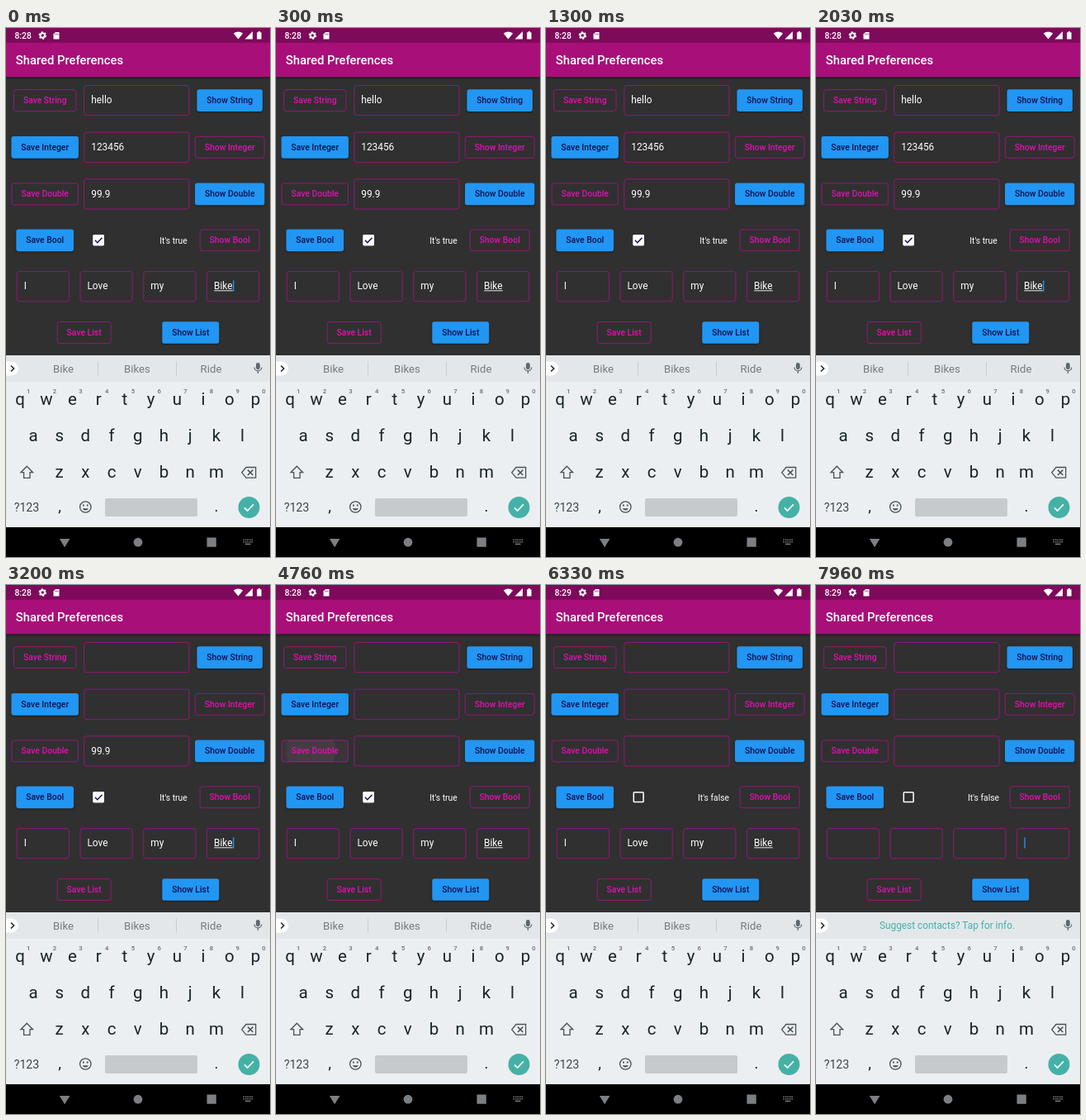
An HTML page for the animation above (8000 ms loop, 320 by 640 pixels).

```html
<!DOCTYPE html>
<html lang="en">
<head>
<meta charset="utf-8">
<title>Shared Preferences</title>
<style>
  html, body { margin: 0; width: 100%; height: 100%; overflow: hidden; background: #000; }
  svg { display: block; }
  #stage { width: 100vw; height: 100vh; }
  text { font-family: Roboto, sans-serif; white-space: pre; }
  .medium { font-weight: 500; }
  .raised { fill: #2196f3; filter: drop-shadow(0 1px 1px rgba(0, 0, 0, .45)); }
  .outlined { fill: none; stroke: #ad118c; stroke-width: .8; }
  .ripple { transform-box: fill-box; transform-origin: center; }
</style>
</head>
<body>
<svg id="stage" viewBox="0 0 320 640">
  <defs>
    <linearGradient id="shade" x2="0" y2="1">
      <stop stop-color="#000" stop-opacity=".4"/>
      <stop offset="1" stop-color="#000" stop-opacity="0"/>
    </linearGradient>
  </defs>

  <rect width="320" height="397" fill="#303030"/>
  <rect y="59" width="320" height="4" fill="url(#shade)"/>
  <rect width="320" height="59.26" fill="#a80f78"/>
  <rect width="320" height="17.8" fill="#7d0a5a"/>
  <text class="medium" x="11.85" y="43.8" font-size="14.81" fill="#fff">Shared Preferences</text>

  <g id="status" fill="#fff">
    <g transform="translate(44.3 9)">
      <circle r="2.7" fill="none" stroke="#fff" stroke-width="2"/>
      <circle r="4" fill="none" stroke="#fff" stroke-width="1.5" stroke-dasharray="2.1 2.09"/>
    </g>
    <path d="M60 5h4.5v8.5h-7V7.5z"/>
    <path d="M59.7 6.5v2M61.3 6.5v2M62.9 6.5v2" stroke="#7d0a5a" stroke-width=".7"/>
    <path d="M281.5 13.5L275.8 6.4Q281.5 2.6 287.2 6.4z"/>
    <path d="M299 4v9.5h-9.5z"/>
    <path d="M304.2 5.2h1.6V4h2.2v1.2h1.6v8.3h-5.4z"/>
  </g>

  <g id="form"></g>

  <g id="checkbox">
    <rect x="106.3" y="250.8" width="11.8" height="11.8" rx=".8" fill="none" stroke="#fff" stroke-width="1.5"/>
    <g id="tick">
      <rect x="105.5" y="250" width="13.3" height="13.3" rx="1.3" fill="#fff"/>
      <path d="M107.9 256.8l2.9 2.9 5.7-5.9" fill="none" stroke="#16125a" stroke-width="1.5"/>
    </g>
  </g>

  <rect y="396" width="320" height="33" fill="#e4e7ea"/>
  <rect y="428" width="320" height="177" fill="#eceff1"/>
  <rect x="-12" y="403.5" width="27" height="17" rx="8.5" fill="#fff"/>
  <path d="M6 408.5l3.6 3.5-3.6 3.5" fill="none" stroke="#222" stroke-width="1.5"/>
  <g id="words" font-size="13.2" fill="#727b80" text-anchor="middle">
    <path d="M111.5 403.5v17M206.5 403.5v17" stroke="#c9cdd0"/>
  </g>
  <text id="hint" x="159" y="416.2" font-size="11.85" fill="#3fb2a4" text-anchor="middle">Suggest contacts? Tap for info.</text>
  <g fill="none" stroke="#5d686d" stroke-width="1.2">
    <rect x="303.6" y="405.6" width="3.6" height="7" rx="1.8" fill="#5d686d"/>
    <path d="M301 410.5a4.4 4.4 0 0 0 8.8 0M305.4 415v3"/>
  </g>

  <g id="keys" fill="#18242a" text-anchor="middle"></g>
  <g fill="none" stroke="#465257" stroke-width="1.3">
    <path d="M25.3 530.2l7.3 7.5h-3.6v6.6h-7.4v-6.6H18z"/>
    <path d="M291 531.5h11.7v12.6H291l-5.2-6.3z"/>
    <path d="M293 534.6l6.4 6.4M299.4 534.6l-6.4 6.4" stroke-width="1.5"/>
    <circle cx="96.3" cy="579.5" r="6.7"/>
    <path d="M92.7 581.2a3.9 3.9 0 0 0 7.2 0z" fill="#465257" stroke="none"/>
    <path d="M93.9 576.4v2.2M98.7 576.4v2.2" stroke-width="1.8"/>
  </g>
  <rect x="120" y="569" width="112" height="22" rx="2" fill="#c7cacd"/>
  <circle cx="294.5" cy="580" r="13" fill="#45b1a6"/>
  <path d="M289 580.3l3.7 3.7 7.3-7.6" fill="none" stroke="#fff" stroke-width="1.7"/>

  <rect y="604" width="320" height="36"/>
  <g fill="#7c8083">
    <path d="M64.8 618h12.6l-6.3 10.2z"/>
    <circle cx="160" cy="622.2" r="5.4"/>
    <rect x="243.5" y="616.5" width="11.3" height="11.3" rx=".6"/>
    <path d="M287.5 619.2h11.5M287.5 621.7h11.5" stroke="#7c8083" stroke-width="1.5" stroke-dasharray="1.5 1"/>
    <path d="M290 624.4h6.5" stroke="#7c8083" stroke-width="1.4"/>
  </g>
</svg>

<script>
const LOOP = 8000;
const SAVED = { string: 2280, integer: 2780, double: 4640, bool: 5880, list: 6980 };
const MINUTE = 5600;
const BLINK = [0, 755, 1800, 2860, 3860, 4860, 5830, 6830, 7830];

const DP = 320 / 432;
const LABEL = 14 * DP, BODY = 16 * DP;
const BUTTON_H = 36 * DP, FIELD_H = 50 * DP;

const byId = id => document.getElementById(id);
const form = byId('form'), keys = byId('keys');

function add(parent, tag, attrs, content = '') {
  const el = document.createElementNS('http://www.w3.org/2000/svg', tag);
  for (const name in attrs) el.setAttribute(name, attrs[name]);
  el.textContent = content;
  parent.append(el);
  return el;
}

const play = (el, frames) => el.animate(
  frames.map(({ at, ...rest }) => ({ offset: at / LOOP, ...rest })),
  { duration: LOOP, iterations: Infinity });

// Shows an element only during the given [start, end] spans.
function during(el, ...spans) {
  const frames = spans[0][0] > 0 ? [{ at: 0, opacity: 0 }] : [];
  for (const [start, end] of spans) {
    frames.push({ at: start, opacity: 1 });
    if (end < LOOP) frames.push({ at: end, opacity: 0 });
  }
  frames.push({ at: LOOP, opacity: frames.at(-1).opacity });
  play(el, frames.map(f => ({ ...f, easing: 'step-end' })));
}
const until = (el, time) => during(el, [0, time]);
const from = (el, time) => during(el, [time, LOOP]);

function ripple(x, y, w, time, color) {
  const clip = add(form, 'svg', { x, y, width: w, height: BUTTON_H });
  const glow = add(clip, 'rect', { width: w, height: BUTTON_H, rx: 3, fill: color, opacity: 0 });
  const splash = add(clip, 'circle', { class: 'ripple', cx: w / 2 - 5, cy: 13, r: 50, fill: color, opacity: 0 });
  const start = time - 90;
  play(glow, [
    { at: 0, opacity: 0 }, { at: start, opacity: 0 }, { at: start + 80, opacity: .07 },
    { at: start + 180, opacity: .06 }, { at: start + 380, opacity: 0 }, { at: LOOP, opacity: 0 }]);
  play(splash, [
    { at: 0, opacity: 0, transform: 'scale(.1)' },
    { at: start, opacity: 0, transform: 'scale(.1)' },
    { at: start + 60, opacity: .09, transform: 'scale(.25)' },
    { at: start + 210, opacity: .07, transform: 'scale(.6)' },
    { at: start + 380, opacity: 0, transform: 'scale(1)' },
    { at: LOOP, opacity: 0, transform: 'scale(1)' }]);
}

// Form items: each knows its width and how to draw itself at (x, middle)
function button(label, raised, time) {
  const text = add(form, 'text', {
    class: 'medium', 'font-size': LABEL, 'text-anchor': 'middle', fill: raised ? '#131050' : '#e30fb2'
  }, label);
  const w = text.getComputedTextLength() + 32 * DP;
  return { w, draw(x, middle) {
    const inset = raised ? 0 : .4, y = middle - BUTTON_H / 2;
    add(form, 'rect', {
      class: raised ? 'raised' : 'outlined', x: x + inset, y: y + inset,
      width: w - 2 * inset, height: BUTTON_H - 2 * inset, rx: 2.8
    });
    if (time) ripple(x, y, w, time, raised ? '#fff' : '#f0a0dc');
    text.setAttribute('x', x + w / 2);
    text.setAttribute('y', middle + .342 * LABEL);
    form.append(text);
  } };
}

function field(value, w, time) {
  return { w, draw(x, middle) {
    add(form, 'rect', {
      class: 'outlined', x: x + .4, y: middle - FIELD_H / 2 + .4, width: w - .8, height: FIELD_H - .8, rx: 2.8
    });
    until(add(form, 'text', { x: x + 12 * DP, y: middle + 3.6, 'font-size': BODY, fill: '#fff' }, value), time);
  } };
}

const gap = w => ({ w, draw() {} });

function row(middle, ...items) {
  const space = (320 - items.reduce((sum, item) => sum + item.w, 0)) / (items.length + 1);
  let x = space;
  for (const item of items) {
    item.draw(x, middle);
    x += item.w + space;
  }
}

row(87.6, button('Save String', false, SAVED.string), field('hello', 128, SAVED.string), button('Show String', true));
row(144.3, button('Save Integer', true, SAVED.integer), field('123456', 128, SAVED.integer), button('Show Integer', false));
row(200.9, button('Save Double', false, SAVED.double), field('99.9', 128, SAVED.double), button('Show Double', true));
row(256.8, button('Save Bool', true, SAVED.bool), gap(128), button('Show Bool', false));
row(312.7, ...['I', 'Love', 'my', 'Bike'].map(word => field(word, 64, SAVED.list)));
row(368.5, button('Save List', false, SAVED.list), button('Show List', true));

until(add(form, 'path', { d: 'M252.3 317.8h22.5', stroke: '#fff', 'stroke-width': .9 }), SAVED.list);

// Caret blinks, and jumps back once the word is cleared
const blink = add(form, 'g', {});
during(blink, ...BLINK.map((t, i) => [t, t + (i ? 500 : 250)]));
const caret = x => add(blink, 'rect', { x, y: 305.5, width: 1.4, height: 13, fill: '#2196f3' });
until(caret(275), SAVED.list);
from(caret(252.4), SAVED.list);

// Texts that change with the state
const stateText = (label, x, y, attrs) =>
  add(form, 'text', { x, y, 'font-size': LABEL, fill: '#fff', ...attrs }, label);
const centered = { 'text-anchor': 'middle' };
const medium = { class: 'medium' };
until(stateText("It's true", 203, 260.6, centered), SAVED.bool);
from(stateText("It's false", 203, 260.6, centered), SAVED.bool);
until(stateText('8:28', 10.4, 12.8, medium), MINUTE);
from(stateText('8:29', 10.4, 12.8, medium), MINUTE);

play(byId('tick'), [
  { at: 0, opacity: 1 }, { at: SAVED.bool - 60, opacity: 1 },
  { at: SAVED.bool + 100, opacity: 0 }, { at: LOOP, opacity: 0 }]);

// Keyboard
const words = byId('words');
[['Bike', 69.5], ['Bikes', 159], ['Ride', 248.5]].forEach(([word, x]) =>
  add(words, 'text', { x, y: 416.7 }, word));
until(words, SAVED.list + 80);
from(byId('hint'), SAVED.list + 80);

const PITCH = 31.7;
['qwertyuiop', 'asdfghjkl', 'zxcvbnm'].forEach((letters, line) =>
  [...letters].forEach((letter, i) => {
    const x = 159.8 + (i - (letters.length - 1) / 2) * PITCH;
    add(keys, 'text', { x, y: 456.3 + line * 43.6, 'font-size': 20.5 }, letter);
    if (line === 0)
      add(keys, 'text', { class: 'medium', x: x + 10, y: 441.8, 'font-size': 7.8, fill: '#667176' }, (i + 1) % 10);
  }));
add(keys, 'text', { x: 25, y: 584.6, 'font-size': 14.2, fill: '#3a464b' }, '?123');
add(keys, 'text', { x: 65, y: 585, 'font-size': 19 }, ',');
add(keys, 'text', { x: 255, y: 585, 'font-size': 19 }, '.');
</script>
</body>
</html>
```
